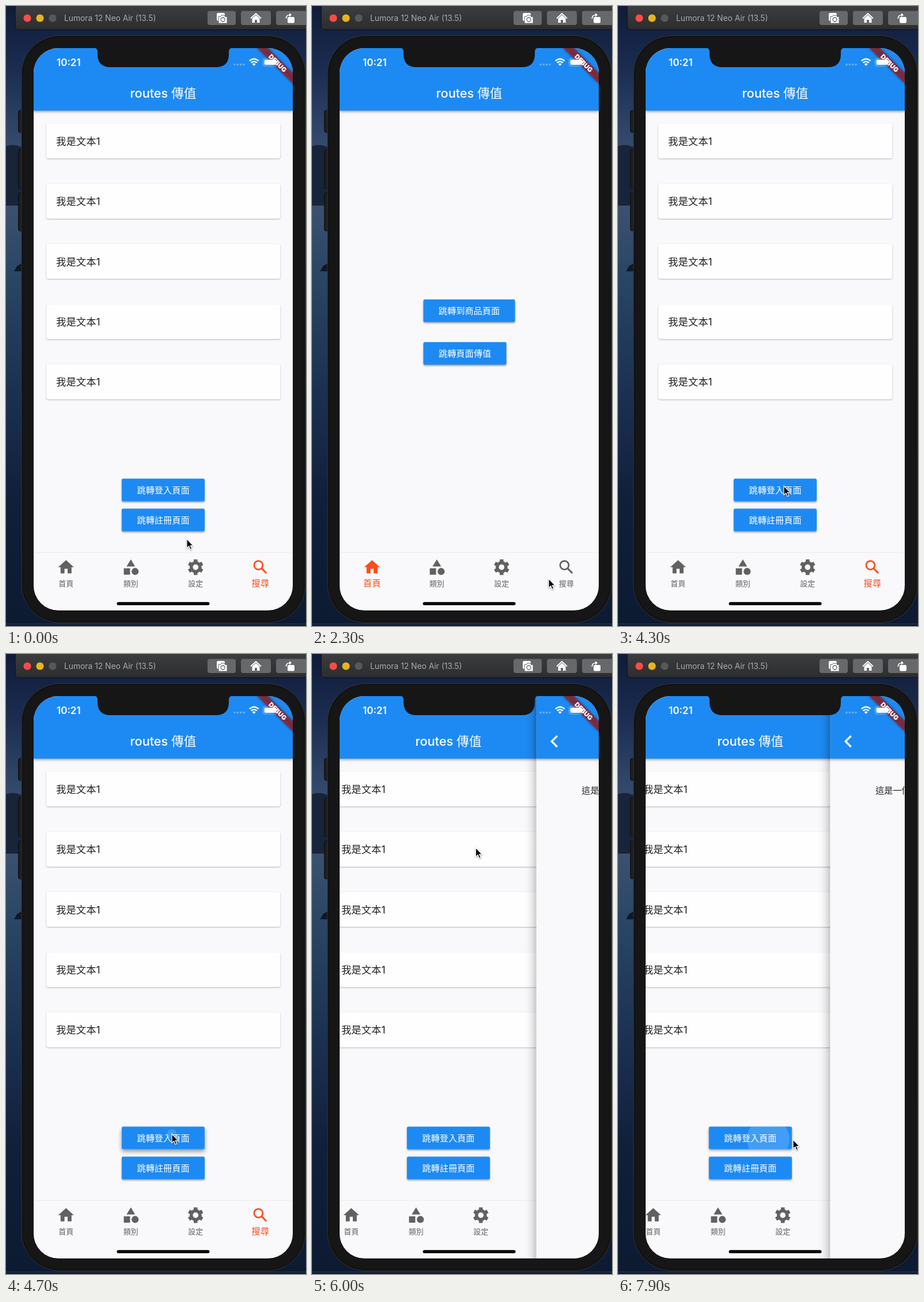
Write an HTML page that moves like this. It is 521 px wide and 1075 px high and loops after 8000 ms.

```html
<!DOCTYPE html>
<html lang="zh-Hant">
<head>
<meta charset="utf-8">
<style>
  html, body { margin: 0; width: 100%; height: 100%; overflow: hidden; background: #0d1830; }
  svg { display: block; }
  text { font-family: Inter, 'Noto Sans CJK TC', 'Noto Sans CJK SC', 'Noto Sans CJK', sans-serif; }
  .bar { fill: #1d8af3; filter: drop-shadow(0 2px 2px #0005); }
  .card { fill: #fefefe; filter: drop-shadow(0 1px 1px #1a1a4050); }
  .face { fill: #1d8af3; filter: drop-shadow(0 2px 1.5px #0006); }
  .line { fill: none; stroke: currentColor; }
</style>
</head>
<body>
<svg id="stage" width="521" height="1075" viewBox="0 0 521 1075"></svg>
<script>
const BLUE = '#1d8af3', PAGE = '#f9f9fb';
const PERIOD = 8000, STEP = 100, SLIDE = 400;
const W = 450, LEFT = 48;
const TABS = [['home', '首頁'], ['category', '類別'], ['settings', '設定'], ['search', '搜尋']];

// Icons on a 24-unit grid
const tooth = a => `<path d="M12 2.1v5M12 16.9v5" class="line" stroke-width="4.8" transform="rotate(${a} 12 12)"/>`;
const ICONS = {
  home: '<path d="M10 20v-6h4v6h5v-8h3L12 3 2 12h3v8z"/>',
  category: '<path d="M12 2l-5.5 9h11zM3 13.5h8v8H3z"/><circle cx="17.5" cy="17.5" r="4.5"/>',
  settings: '<circle cx="12" cy="12" r="5.6" class="line" stroke-width="4.1"/>' + [0, 60, 120].map(tooth).join(''),
  search: '<circle cx="9.5" cy="9.5" r="5.5" class="line" stroke-width="2"/><path d="M13.6 13.6l6.1 6.1" class="line" stroke-width="2.2"/>'
};

const text = (x, y, size, str, fill = '#222', attrs = '') =>
  `<text x="${x}" y="${y}" font-size="${size}" fill="${fill}" ${attrs}>${str}</text>`;
const centered = (x, y, size, str, fill, weight = 500) =>
  text(x, y, size, str, fill, `text-anchor="middle" font-weight="${weight}"`);
const rect = (x, y, w, h, r, fill, attrs = '') =>
  `<rect x="${x}" y="${y}" width="${w}" height="${h}" rx="${r}" fill="${fill}" ${attrs}/>`;
const button = (id, x, y, w, label) => `<g id="${id}">
  <rect class="face" x="${x}" y="${y}" width="${w}" height="39" rx="2.2"/>
  <svg x="${x}" y="${y}" width="${w}" height="39" overflow="hidden"><circle fill="#fff"/></svg>
  ${centered(x + w / 2, y + 25.2, 15.2, label, '#fff')}</g>`;
const appBar = title => `<rect class="bar" x="48" y="73" width="450" height="108.5"/>
  ${centered(273, 159, 21.7, title, '#fff')}`;
const card = i => {
  const y = 204 + i * 104.4;
  return `<rect class="card" x="70" y="${y}" width="406.5" height="60.3" rx="4"/>` + text(87, y + 36.8, 17.4, '我是文本1');
};
const tab = ([name, label], i) => {
  const x = 104.3 + i * 112.5;
  return `<g id="${name}Tab"><g transform="translate(${x - 16.3} 956.7) scale(1.358)" fill="currentColor">${ICONS[name]}</g>
    ${centered(x, 1006, 13, label, 'currentColor', 400)}</g>`;
};
const toolButton = (x, w, icon) => rect(x, 8.5, w, 24.5, 4, '#66686b') + icon;

const defs = `<defs>
  <linearGradient id="sky" x2="0" y2="1">
    <stop stop-color="#101c38"/><stop offset=".1" stop-color="#1a2c50"/><stop offset=".22" stop-color="#344a6c"/>
    <stop offset=".33" stop-color="#3b506e"/><stop offset=".42" stop-color="#2c4766"/><stop offset=".6" stop-color="#1d3354"/>
    <stop offset=".8" stop-color="#101f3a"/><stop offset="1" stop-color="#0c1a32"/>
  </linearGradient>
  <linearGradient id="chrome" x2="0" y2="1"><stop stop-color="#3c3d3f"/><stop offset="1" stop-color="#2c2d2f"/></linearGradient>
  <linearGradient id="edge">
    <stop stop-opacity="0"/><stop offset=".3" stop-opacity=".016"/><stop offset=".6" stop-opacity=".07"/><stop offset="1" stop-opacity=".2"/>
  </linearGradient>
  <clipPath id="screen"><rect x="48" y="73" width="450" height="975" rx="43"/></clipPath>
</defs>`;

const desktop = `<rect width="521" height="1075" fill="url(#sky)"/>
  <path d="M0 243Q14 238 30 246V346H0z" fill="#18243a"/>
  <path d="M14 460l5-9 10-6v15z" fill="#101827"/>
  <path d="M0 1071.5H521" stroke="#2d3f5c"/>`;

const sideKeys = [[181, 38], [249, 67], [324, 66]]
  .map(([y, h]) => rect(21.5, y, 12, h, 3, '#1d1e20', 'stroke="#090909"')).join('');
const body = sideKeys + rect(512, 247, 8, 110, 3, '#1d1e20') +
  rect(27, 51.5, 493, 1018, 66, '#121213', 'stroke="#333437"') + rect(30, 54.5, 487, 1012, 63, '#161617');

const tabsPage = `<g id="tabs">${rect(48, 73, 450, 975, 0, PAGE)}
  <g id="searchBody">${[0, 1, 2, 3, 4].map(card).join('')}
    ${button('toLogin', 201, 819.5, 144, '跳轉登入頁面')}${button('toRegister', 201, 871.5, 144, '跳轉註冊頁面')}</g>
  <g id="homeBody">${button('toGoods', 193.5, 508.7, 159, '跳轉到商品頁面')}${button('toValue', 193.5, 582.7, 144, '跳轉頁面傳值')}</g>
  ${appBar('routes 傳值')}
  <path d="M48 947.5h450" stroke="#ececee"/>${TABS.map(tab).join('')}</g>`;

const loginPage = `<g id="login"><rect x="25.5" y="73" width="22.5" height="975" fill="url(#edge)"/>
  ${rect(48, 73, 450, 975, 0, PAGE)}${appBar('登入')}
  <path d="M84 142l-9.5 9.5 9.5 9.5" fill="none" stroke="#fff" stroke-width="3.2"/>
  ${centered(273, 242, 15.2, '這是一個登入頁面,點擊登入會執行登入動作', '#222', 400)}
  ${button('submit', 225, 297, 96, '登入')}</g>`;

const banner = `<g transform="translate(498 73) rotate(45)">
  ${rect(-43.5, 30.4, 87, 13, 0, '#000', 'opacity=".5" style="filter:blur(2px)"')}
  ${rect(-43.5, 30.4, 87, 13, 0, '#b71c1c', 'opacity=".63"')}
  ${centered(0, 41, 11.1, 'DEBUG', '#fff', 900)}</g>`;

const status = text(88, 103.5, 17, '10:21', '#fff', 'font-weight="600"') +
  [397, 402.3, 407.6, 412.9].map(x => `<circle cx="${x}" cy="101.5" r="1.7" fill="#fff" opacity=".35"/>`).join('') +
  `<g fill="none" stroke="#fff" stroke-width="2.4"><path d="M422.8 95.2q7.9-7 15.8 0M425.6 98.4q5.1-4.4 10.2 0"/></g>
  <path d="M427.7 100.7q3-2.4 6 0l-3 3z" fill="#fff"/>` +
  rect(446.5, 91, 25, 13, 3.5, 'none', 'stroke="#fff" stroke-opacity=".45"') + rect(448.5, 93, 21, 9, 2, '#fff') +
  '<path d="M152 72.5q7 0 7 7v4q0 22.5 22 22.5h184q22 0 22-22.5v-4q0-7 7-7z" fill="#161617"/>';

const toolbar = `<path d="M16 -1H522V41H22q-6 0-6-6z" fill="url(#chrome)" stroke="#0b0c10"/>` +
  ['#fc4b48', '#e6b422', '#57585a'].map((c, i) => `<circle cx="${37 + i * 22}" cy="21" r="6.6" fill="${c}"/>`).join('') +
  text(101, 26, 13.8, 'Lumora 12 Neo Air (13.5)', '#a9aaac') +
  toolButton(350, 49, rect(366, 12, 14, 14, 2.5, '#fff') +
    '<path d="M369 18.5h3.5l1.5-2.5h5l1.5 2.5h3.500v11.500h-15z" fill="#fff" stroke="#66686b"/><circle cx="376.500" cy="23.500" r="3.500" fill="none" stroke="#66686b" stroke-width="1.300"/>') +
  toolButton(408, 52, `<path d="M425 21.500l9-8.500 9 8.500" fill="none" stroke="#fff" stroke-width="1.800"/>
    <path d="M434 15.500l6.500 6v7.500h-4.500v-5h-4v5h-4.500v-7.500z" fill="#fff"/>`) +
  toolButton(469, 60, rect(489, 19, 12, 10.5, 2, '#fff') +
    '<path d="M486.500 22q-.5-6.500 7-6.500" fill="none" stroke="#fff" stroke-width="1.600"/><path d="M492 12l4 3.500-4 3.500z" fill="#fff"/>');

const pointer = `<path id="cursor" d="M0 0V16L3.700 12.600 6.200 18.400 8.800 17.300 6.300 11.600H11z"
  stroke="#fff" stroke-width="1.200" style="filter:drop-shadow(0 1px 1px #0006)"/>`;

document.getElementById('stage').innerHTML = defs + desktop + body +
  `<g clip-path="url(#screen)">${tabsPage}${loginPage}${banner}${status}</g>` +
  rect(192.5, 1033.5, 161, 5.5, 2.75, '#000') + toolbar + pointer;

// Timing
const HOME_TAP = 1700, SEARCH_TAP = 2700;
const PUSH = 4756, POP = 5870, PUSH_AGAIN = 7856;
const PATH = [ // time, x, y
  [0, 314, 924], [700, 314, 926], [1200, 268, 997], [1600, 108, 984], [1800, 108, 984], [2300, 411, 993],
  [2550, 440, 984], [2900, 440, 984], [3700, 300, 850], [4300, 288, 832], [4800, 288, 832], [5400, 281, 308],
  [5600, 281, 306], [5950, 281, 306], [6700, 331, 752], [7400, 304, 842], [8000, 304, 842]
];
const $ = id => document.getElementById(id);
const clamp = v => Math.max(0, Math.min(1, v));

function bezier(x1, y1, x2, y2) {
  const at = (a, b, s) => 3 * a * s * (1 - s) ** 2 + 3 * b * s * s * (1 - s) + s ** 3;
  return x => {
    x = clamp(x);
    let lo = 0, hi = 1;
    for (let i = 0; i < 24; i++) {
      const mid = (lo + hi) / 2;
      if (at(x1, x2, mid) < x) lo = mid; else hi = mid;
    }
    return at(y1, y2, lo);
  };
}
const slideEase = bezier(.35, .91, .33, .97);
const tabEase = bezier(.4, 0, .2, 1);

function cursorAt(t) {
  const i = PATH.findIndex(p => p[0] > t);
  const [t0, x0, y0] = PATH[i - 1], [t1, x1, y1] = PATH[i];
  const k = (t - t0) / (t1 - t0);
  return [x0 + (x1 - x0) * k, y0 + (y1 - y0) * k];
}

function setTab(name, k) {
  const el = $(name + 'Tab'), mix = (a, b) => a + (b - a) * k;
  el.style.color = `rgb(${mix(97, 251)},${mix(97, 76)},${mix(97, 31)})`;
  el.lastElementChild.setAttribute('font-size', mix(13, 15.2));
}

// Splash grows slowly while held, then spreads and fades after release
function press(id, x, y, age) {
  const [face, , ] = $(id).children, splash = $(id).querySelector('circle');
  const active = age > 0 && age < 450;
  const r = age < 150 ? age * .08 : 12 + (age - 150) * .5;
  splash.setAttribute('cx', x);
  splash.setAttribute('cy', y);
  splash.setAttribute('r', active ? r : 0);
  splash.setAttribute('opacity', .16 * clamp((450 - age) / 200));
  const lift = clamp(age / 100) * clamp((220 - age) / 70);
  face.style.filter = `drop-shadow(0 ${2 + 2 * lift}px ${1.5 + 2 * lift}px #0006)`;
}

function draw(t) {
  const onHome = t >= HOME_TAP && t < SEARCH_TAP;
  $('homeBody').style.display = onHome ? '' : 'none';
  $('searchBody').style.display = onHome ? 'none' : '';
  const home = tabEase((t - HOME_TAP) / 200) - tabEase((t - SEARCH_TAP) / 200);
  setTab('home', home);
  setTab('category', 0);
  setTab('settings', 0);
  setTab('search', 1 - home);

  const slide = start => slideEase((t - start) / SLIDE);
  const shown = slide(PUSH) - slide(POP) + slide(PUSH_AGAIN);
  $('tabs').setAttribute('transform', `translate(${-W / 3 * shown} 0)`);
  $('login').setAttribute('transform', `translate(${W * (1 - shown)} 0)`);
  $('login').style.display = shown > .0005 ? '' : 'none';

  const again = t > 7000;
  press('toLogin', again ? 103 : 87, again ? 22 : 12.5, t - (again ? 7700 : 4600));
  press('submit', 56, 9, t - 5700);
  $('cursor').setAttribute('transform', `translate(${cursorAt(t)})`);
}

function tick() {
  draw(Math.floor(performance.now() % PERIOD / STEP) * STEP);
  requestAnimationFrame(tick);
}
tick();
</script>
</body>
</html>
```
